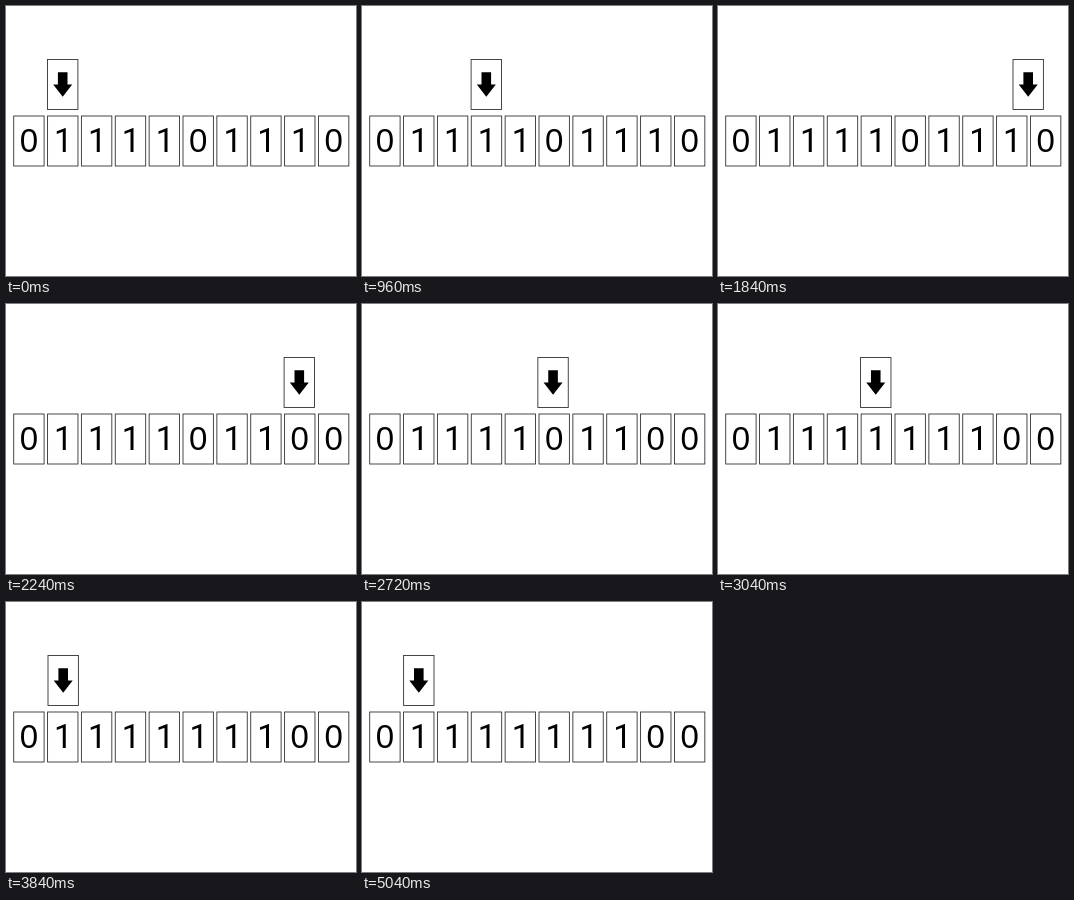
These frames come from a looping animation (350x270 px, 5360 ms). An HTML page:

```html
<!DOCTYPE html>
<html lang="en">
<head>
<meta charset="utf-8">
<title>Tape machine</title>
<style>
  html, body { margin: 0; width: 100%; height: 100%; overflow: hidden; background: #fff; }
  svg { display: block; width: 350px; height: 270px; }
  rect { fill: none; stroke: #333; stroke-width: .9; }
  text { font: 33px Arial, "Liberation Sans", sans-serif; text-anchor: middle; }
  .one { font-family: Roboto, sans-serif; transform: translateX(.6px); }
</style>
</head>
<body>
<svg viewBox="0 0 350 270">
  <g id="tape"></g>
  <g id="head">
    <rect y="53.5" width="30.4" height="50"/>
    <path d="M10.4 66.2h9.6v12.2h4.7l-9.5 12.3l-9.5-12.3h4.7z"/>
  </g>
</svg>
<script>
const STEP = 80, STEPS = 67, LEFT = 7.7, PITCH = 33.86, HEAD_STEP = 16.9;
const START = '0111101110';

// Head position in half cells at each step; linear between the points.
// It comes to rest slightly off and drifts back before the loop restarts.
const path = [[0, 2], [10, 2], [11, 5], [24, 18], [26, 16], [28, 16],
              [34, 9.95], [36, 9.95], [42, 4.04], [46, 0.03], [48, 2.03], [STEPS, 2]];

// A written cell is blank for one step before its new digit appears.
const writes = [{ cell: 8, step: 27, digit: '0' }, { cell: 5, step: 35, digit: '1' }];

const tape = document.getElementById('tape');
const head = document.getElementById('head');

tape.innerHTML = [...START].map((_, i) =>
  `<g transform="translate(${LEFT + i * PITCH})">
     <rect y="110" width="30.4" height="50"/>
     <text x="15.2" y="146"></text>
   </g>`).join('');
const cells = tape.querySelectorAll('text');

function setDigit(i, digit) {
  cells[i].textContent = digit;
  cells[i].classList.toggle('one', digit === '1'); // a 1 without a foot
}

function headAt(step) {
  const i = path.findIndex(([end]) => end > step);
  const [s0, p0] = path[i - 1], [s1, p1] = path[i];
  return p0 + (p1 - p0) * (step - s0) / (s1 - s0);
}

function draw(now) {
  const step = Math.floor(now / STEP) % STEPS;
  head.setAttribute('transform', `translate(${LEFT + headAt(step) * HEAD_STEP})`);
  for (const w of writes) {
    setDigit(w.cell, step < w.step ? START[w.cell] : step === w.step ? '' : w.digit);
  }
}

let start;
function tick(now) {
  start ??= now;
  draw(now - start);
  requestAnimationFrame(tick);
}
[...START].forEach((digit, i) => setDigit(i, digit));
draw(0);
requestAnimationFrame(tick);
</script>
</body>
</html>
```
